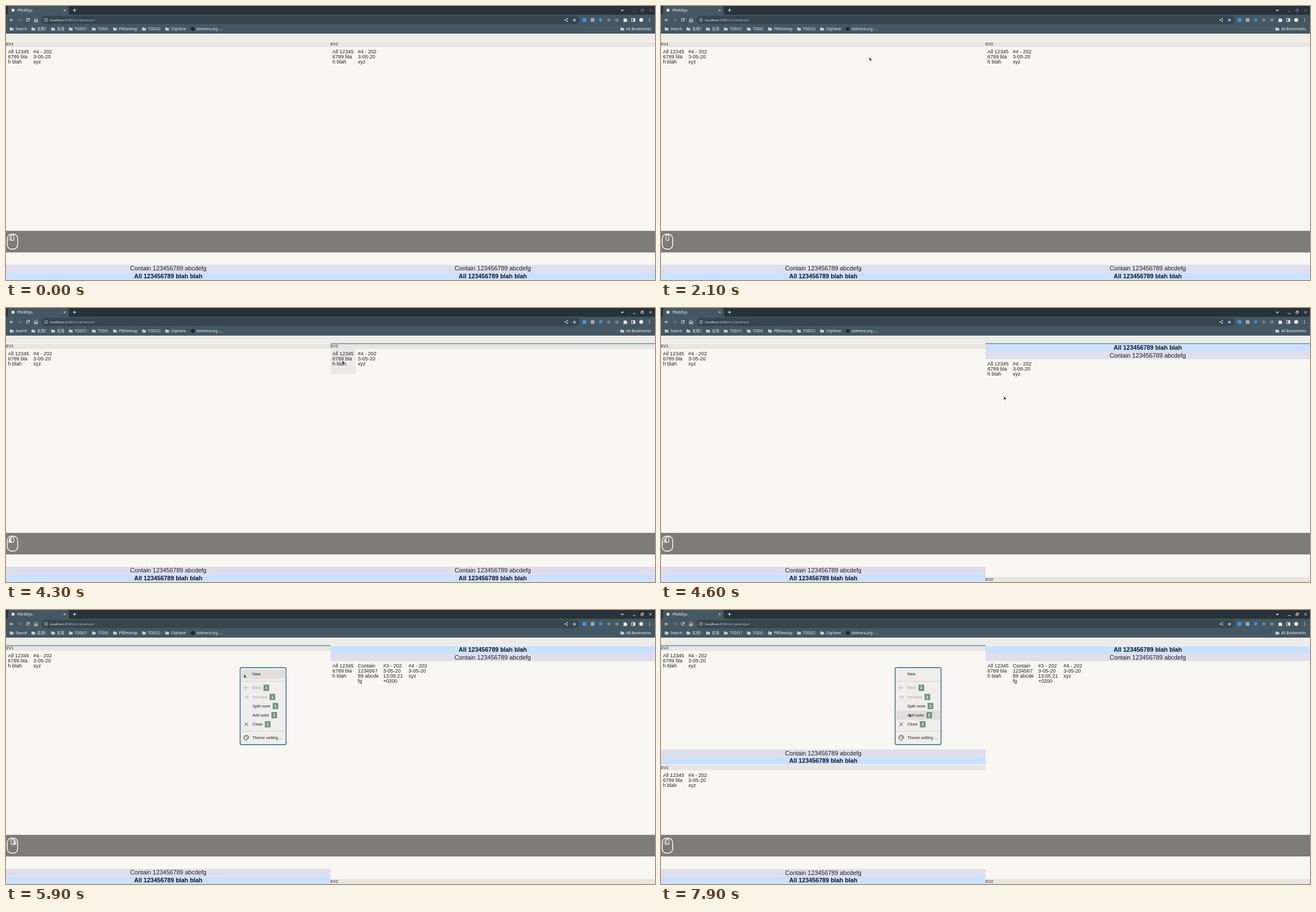
An HTML page for the animation above (8000 ms loop, 1152 by 486 pixels).

```html
<!DOCTYPE html>
<html lang="en">
<head>
<meta charset="utf-8">
<title>Split panes</title>
<style>
  html, body { margin: 0; width: 100%; height: 100%; overflow: hidden; background: #f8f7f2; }
  svg { display: block; width: 1152px; height: 486px; }
  text { white-space: pre; }
  .page { font-family: "Liberation Sans", Arial, sans-serif; fill: #222; }
  .chrome { font-family: "Noto Sans", "Noto Sans CJK SC", "Noto Sans CJK", sans-serif; fill: #f1f3f4; }
</style>
</head>
<body>
<svg id="stage" viewBox="0 0 1152 486" xmlns="http://www.w3.org/2000/svg">
  <g id="browser" class="chrome"></g>
  <g id="scene" class="page"></g>
</svg>
<script>
const LOOP = 8000, STEP = 100;
const PAGE_TOP = 62.6, HALF = 576, ROW = 13.5, CELL = 45;

// cursor: time, x, y of the tip
const PATH = [
  [200, -4, 136], [900, 126, 95], [1000, 132.5, 89], [1100, 132.5, 89],
  [1800, 263, 90], [2700, 584, 92], [3100, 592, 89], [4000, 592, 89],
  [4200, 592, 66], [4500, 607, 148], [4600, 608.5, 156.5], [4800, 610, 158],
  [5100, 640, 83], [5300, 640, 83], [5700, 426, 104], [5800, 416, 103],
  [5900, 422.5, 114], [6600, 441, 155], [6800, 440.7, 164],
  [7600, 441, 168], [7900, 440.5, 184]
];
// mouse button brightness: time, level
const LEFT = [[0, .35], [300, 0], [4100, 0], [4200, .9], [4400, .9], [4600, .6], [4800, 0],
  [5000, 0], [5100, .9], [5400, 0], [7500, 0], [7600, .9], [7900, .3]];
const RIGHT = [[5700, 0], [5800, .9], [5900, .65], [6200, 0]];
const WINDOW_FOCUS = 4200, FLIP = 4500, EXPAND = 5200, MENU = 5800, SPLIT = 7700;

const ALL = ["All 12345", "6789 bla", "h blah"];
const CONTAIN = ["Contain", "1234567", "89 abcde", "fg"];
const THIRD = ["#3 - 202", "3-05-20", "13:05:21", "+0200"];
const FOURTH = ["#4 - 202", "3-05-20", "xyz"];

const rect = (x, y, w, h, fill, more = "") =>
  `<rect x="${x}" y="${y}" width="${w}" height="${h}" fill="${fill}" ${more}/>`;
const label = (x, mid, str, size, more = "") =>
  `<text x="${x}" y="${mid + size * .347}" font-size="${size}" ${more}>${str}</text>`;
const line = (d, color, w = 1, more = "") =>
  `<path d="${d}" fill="none" stroke="${color}" stroke-width="${w}" ${more}/>`;
const dot = (x, y, r, fill) => `<circle cx="${x}" cy="${y}" r="${r}" fill="${fill}"/>`;

function sample(table, t) {
  if (t <= table[0][0]) return table[0].slice(1);
  for (let i = 1; i < table.length; i++) {
    const a = table[i - 1], b = table[i];
    if (t <= b[0]) {
      const k = (t - a[0]) / (b[0] - a[0]);
      return a.slice(1).map((v, j) => v + (b[j + 1] - v) * k);
    }
  }
  return table[table.length - 1].slice(1);
}

function folder(x, text) {
  const d = `M${x - 3.3} 38h2.6l.9 .9h3.1v4.6h-6.6z`;
  return `<path d="${d}" fill="#c3cbcf"/>` + label(x + 7, 40.6, text, 6.5);
}

function browser() {
  const w = "#f1f3f4", dim = "#7d8b92";
  let s = rect(0, 0, 1152, 16, "#28323b") + rect(0, 15.5, 1152, 33.5, "#445863");
  s += `<path d="M0 16Q3.5 16 3.5 12V4Q3.5 0 7 0H108Q111.500 0 111.500 4V12Q111.500 16 115 16z" fill="#445863"/>`;
  s += dot(12.5, 7.5, 2.7, "#dfe4e6") + label(20, 7.6, "PReMSys", 6.4);
  s += line("M102.500 5.800l3.400 3.400m0 -3.400l-3.400 3.400", w, .9);
  s += line("M118.600 7.500h6M121.600 4.500v6", w, 1);
  s += line("M1091.700 6.500l2.300 2.300l2.300 -2.300", w, 1.1);
  s += rect(63, 17.5, 955, 14.5, "#36454e", 'rx="7.200"');
  // navigation buttons
  s += line("M13 24.800h-6M9.800 22l-2.800 2.800l2.800 2.800", w, 1);
  s += line("M21.500 24.800h6M24.700 22l2.800 2.800l-2.800 2.800", dim, 1);
  s += line("M41 23.200a2.700 2.700 0 1 0 .3 2.400M41.500 21.700v2.300h-2.300", w, 1);
  s += line("M49.500 25l3.700 -3.300l3.700 3.300M50.700 24.300v3.800h1.700v-2.300h1.700v2.300h1.700v-3.800", w, .9);
  s += `<circle cx="71" cy="24.700" r="2.900" fill="none" stroke="#ccd3d7" stroke-width=".8"/>` +
    line("M71 24.200v2.100M71 22.800v.8", "#ccd3d7", .8);
  s += label(78, 24.7, `localhost<tspan fill="#b4bfc5">:8080/src/premsys/</tspan>`, 6.03);
  // right side of the address bar
  s += line("M996.300 22.600l-3.700 2.200l3.700 2.200", w, .7) +
    dot(996.5, 22.5, 1, w) + dot(992.4, 24.8, 1, w) + dot(996.5, 27, 1, w);
  s += `<path d="M1009 21.300l1 2.400l2.600 .2l-2 1.700l.6 2.500l-2.200 -1.300l-2.200 1.300l.6 -2.500l-2 -1.700l2.600 -.2z" fill="#8ab4f8"/>`;
  s += rect(1023.500, 21.500, 6.500, 6.500, "#4c8df0") + rect(1038, 21.500, 6.500, 6.500, "#a4aaab") +
    dot(1055.5, 24.5, 3, "#4b86d2") + dot(1070, 24.800, 2.800, "#73828a") +
    rect(1081.300, 22.300, 6, 5.200, "#73828a");
  s += `<path d="M1096 22.800h1.900a1.100 1.100 0 0 1 2.200 0h1.800v1.700a1.100 1.100 0 0 1 0 2.200v1.500h-5.900v-1.700a1.100 1.100 0 0 0 0 -2.100z" fill="${w}"/>`;
  s += rect(1110.500, 22.200, 5.600, 5.200, "none", `stroke="${w}" stroke-width=".9"`) + rect(1113.500, 22, 3, 5.500, w);
  s += dot(1127.500, 24.700, 3.400, "#e9ecee");
  for (const y of [22.3, 24.8, 27.3]) s += dot(1142.3, y, .75, w);
  // bookmarks
  const marks = [[10, "Search"], [48.500, "实用1"], [83.500, "实用"], [115, "TODO1"], [156, "TODO"],
    [193.500, "PRDevelop"], [245, "TODO2"], [286, "ClipVane"], [1094, "All Bookmarks"]];
  s += marks.map(m => folder(...m)).join("");
  s += dot(331.500, 40.800, 3.500, "#20272c") + label(338, 40.6, "dolmera.org -…", 6.5);
  s += line("M1086 37v7.500", "#65767f", .8);
  return s + rect(0, 49, 1152, 13.4, "#eeece7");
}

function windowButtons(focused) {
  const c = focused ? "#f1f3f4" : "#7d8990";
  return line("M1112.800 9.800h4.400", c, .9) +
    line("M1127 6.700h3.200v3.200h-3.200zM1128.200 6.500v-1.200h3.300v3.300h-1.100", c, .8) +
    line("M1142 5.600l4 4m0 -4l-4 4", c, .9);
}

function inside(p, x, y, w, h) {
  return p && p[0] >= x && p[0] < x + w && p[1] >= y && p[1] < y + h;
}

const shade = (x, y, w, h) => rect(x, y, w, h, "#000", 'opacity=".05"');

function pane(o, pointer) {
  const { x, top, bottom } = o;
  let s = rect(x, top, HALF, bottom - top, "#f8f7f2");
  const y = top + 1;
  const title = at => rect(x, at, HALF, 9, "#e7e6e1") + label(x, at + 4.3, o.name, 7.2);
  const band = (at, main) => {
    const text = main ? "All 123456789 blah blah" : "Contain 123456789 abcdefg";
    const look = main ? 'font-weight="bold" fill="#0b1526"' : "";
    return rect(x, at, HALF, ROW, main ? "#cce0ff" : "#dfdeec") +
      (inside(pointer, x, at, HALF, ROW) ? shade(x, at, HALF, ROW) : "") +
      label(x + HALF / 2, at + ROW / 2, text, 10.8, `text-anchor="middle" ${look}`);
  };
  if (o.flipped) s += band(y, true) + band(y + ROW, false) + title(bottom - 9);
  else s += title(y) + band(bottom - 2 * ROW, false) + band(bottom - ROW, true);
  const cy = y + (o.flipped ? 2 * ROW : 9);
  o.cells.forEach((lines, i) => {
    const cx = x + i * CELL;
    if (inside(pointer, cx, cy, CELL, CELL)) s += shade(cx, cy, CELL, CELL);
    lines.forEach((str, j) => s += label(cx + 3.6, cy + 8.1 + j * 9, str, 9));
  });
  if (o.active) s += rect(x, top, HALF, 1.1, "#2a6592");
  return s;
}

// text, centre y, badge x, disabled
const ITEMS = [["New", 114], ["Back", 138, 457.1, true], ["Forward", 154.200, 467.800, true],
  ["Split more", 170.300, 473.300], ["Add subs", 186.500, 471.100], ["Close", 202.700, 459.500],
  ["Theme setting ...", 226.600]];

function menu(pointer, count) {
  let s = rect(415.6, 102.2, 81.5, 136.6, "#f0eeea", 'rx="2.500" stroke="#2c6696" stroke-width="1.400"');
  for (const [text, y, bx, off] of ITEMS) {
    const ink = off ? "#a7a6a1" : "#222";
    if (!off && inside(pointer, 416, y - 8.1, 81, 16.2)) s += rect(416.300, y - 8.1, 80.1, 16.2, "#e1dfdb");
    s += label(437.2, y, text, 7.2, `fill="${ink}"`);
    if (bx) s += rect(bx, y - 5.5, 10, 11, "#6b9480") +
      label(bx + 5, y, count, 7.2, 'fill="#fff" font-weight="bold" text-anchor="middle"');
  }
  for (const y of [126, 214.700]) s += rect(416.300, y, 80.1, .9, "#d4d2cd");
  s += line("M430.300 138h-7.400m3.400 -3.400l-3.400 3.400l3.400 3.400M422.700 154.200h7.400m-3.400 -3.400l3.400 3.400l-3.400 3.400", "#a7a6a1", .9);
  s += line("M423.300 199.600l6.200 6.200m0 -6.200l-6.200 6.200", "#222", .9);
  s += line("M426.500 222.200a4.400 4.400 0 0 0 0 8.800c1.500 0 1.200 -1 .9 -1.700c-.3 -1 .3 -1.500 1.200 -1.500h1.200c.8 0 1.200 -.6 1.200 -1.500a4.400 4.200 0 0 0 -4.500 -4.100z", "#222", .9);
  for (const [x, y] of [[424, 226.600], [425.300, 224.500], [427.700, 224.500], [429, 226.300]]) s += dot(x, y, .7, "#222");
  return s;
}

function mouse(left, right) {
  const half = (d, a) => a > 0 ? `<path d="${d}" fill="#fff" opacity="${a}"/>` : "";
  return rect(0, 398.8, 1152, 38.3, "#7d7c77") +
    half("M11 406Q4.500 406.500 4.300 416.500H11z", left) +
    half("M12 406Q18.500 406.500 18.700 416.500H12z", right) +
    rect(2.300, 404.7, 18.400, 26.600, "none", 'rx="7.500" stroke="#fff" stroke-width="1.400"') +
    rect(8.9, 406.300, 5.200, 9.500, "#7d7c77", 'rx="2.600" stroke="#fff" stroke-width="1.100"');
}

const cursor = ([x, y]) =>
  `<path transform="translate(${x} ${y})" d="M0 0V6.500L1.500 5.200L2.500 7.500L3.600 7L2.600 4.800H4.600z" fill="#111" stroke="#fff" stroke-width=".5"/>`;

function scene(t) {
  const pointer = t >= PATH[0][0] ? sample(PATH, t) : null;
  const open = t >= MENU, split = t >= SPLIT;
  const pagePointer = open ? null : pointer;
  const short = [ALL, FOURTH];
  const mid = PAGE_TOP + (486 - PAGE_TOP) / 2;
  const panes = [{
    x: HALF, top: PAGE_TOP, bottom: 486, name: "EV2", flipped: t >= FLIP,
    active: t >= WINDOW_FOCUS && !open,
    cells: t >= EXPAND ? [ALL, CONTAIN, THIRD, FOURTH] : short
  }, {
    x: 0, top: PAGE_TOP, bottom: split ? mid : 486, name: split ? "EV3" : "EV1", active: open, cells: short
  }];
  if (split) panes.push({ x: 0, top: mid, bottom: 486.4, name: "EV1", cells: short });
  return windowButtons(t >= WINDOW_FOCUS) +
    panes.map(p => pane(p, pagePointer)).join("") +
    mouse(sample(LEFT, t)[0], sample(RIGHT, t)[0]) +
    (open ? menu(pointer, split ? 2 : 1) : "") +
    (pointer ? cursor(pointer) : "");
}

document.getElementById("browser").innerHTML = browser();
const view = document.getElementById("scene");
const start = performance.now();
let shown = -1;
function draw() {
  const t = Math.floor((performance.now() - start) % LOOP / STEP) * STEP;
  if (t !== shown) view.innerHTML = scene(shown = t);
  requestAnimationFrame(draw);
}
draw();
</script>
</body>
</html>
```
